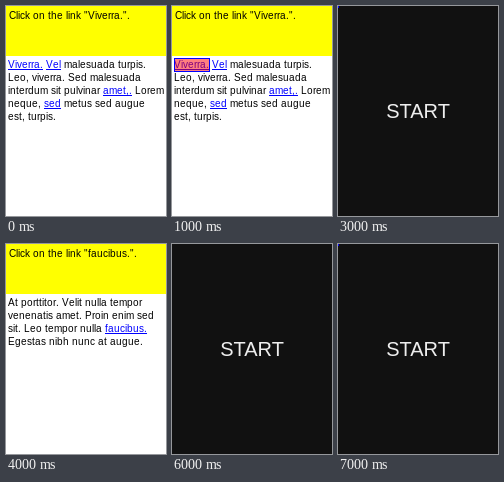
An HTML page for the animation above (8000 ms loop, 160 px wide and 210 px high).

```html
<!DOCTYPE html>
<html lang="en">
<head>
<meta charset="utf-8">
<title>Link task</title>
<style>
  html, body { margin: 0; width: 100%; height: 100%; overflow: hidden; background: #fff; }
  svg { display: block; width: 160px; height: 210px; }
  text { font: 10px "Liberation Sans", Arial, sans-serif; fill: #000; }
  .link { fill: #00f; }
  .start { font-size: 20px; fill: #eee; text-anchor: middle; }
  .mark { fill: #f00; fill-opacity: .5; stroke: #00f; }
  rect { shape-rendering: crispEdges; }
</style>
</head>
<body>
<svg viewBox="0 0 160 210" width="160" height="210">
  <g id="page"></g>
  <g id="cover">
    <rect width="160" height="210" fill="#111"/>
    <text class="start" x="80" y="112">START</text>
    <rect id="corner" width="1" height="2" fill="#00f"/>
  </g>
</svg>
<script>
const SIZE = 10, LINE = 13, LOOP = 8000, STEP = 1000;

// Links are wrapped in square brackets.
const tasks = [
  {
    query: 'Click on the link "Viverra.".',
    lines: [
      '[Viverra.] [Vel] malesuada turpis.',
      'Leo, viverra. Sed malesuada',
      'interdum sit pulvinar [amet,.] Lorem',
      'neque, [sed] metus sed augue',
      'est, turpis.'
    ],
    mark: [2, 52, 36, 14]
  },
  {
    query: 'Click on the link "faucibus.".',
    lines: [
      'At porttitor. Velit nulla tempor',
      'venenatis amet. Proin enim sed',
      'sit. Leo tempor nulla [faucibus.]',
      'Egestas nibh nunc at augue.'
    ],
    mark: [99, 78, 43, 14]
  }
];

const pen = document.createElement('canvas').getContext('2d');
pen.font = '100px "Liberation Sans", Arial, sans-serif';

function add(parent, name, attrs, content) {
  const el = document.createElementNS('http://www.w3.org/2000/svg', name);
  for (const key in attrs) el.setAttribute(key, attrs[key]);
  if (content) el.textContent = content;
  return parent.appendChild(el);
}

// Glyphs sit on whole pixels, as in a hinted layout.
function write(parent, str, x, y, link) {
  const xs = [];
  let end = x;
  for (const ch of str) {
    xs.push(end);
    end += Math.round(pen.measureText(ch).width * SIZE / 100);
  }
  if (str.trim()) add(parent, 'text', { x: xs.join(' '), y, class: link ? 'link' : 'plain' }, str);
  if (link) add(parent, 'rect', { x, y: y + 1, width: end - x, height: 1, class: 'link' });
  return end;
}

function writeLine(parent, line, y) {
  let x = 2;
  line.split(/[\[\]]/).forEach((part, i) => {
    // Leading blanks become an offset, since SVG trims them.
    const text = part.trimStart();
    x += (part.length - text.length) * 3;
    x = write(parent, text, x, y, i % 2 === 1);
  });
}

function build(task) {
  const g = add(document.getElementById('page'), 'g', {});
  add(g, 'rect', { width: 160, height: 210, fill: '#fff' });
  add(g, 'rect', { width: 160, height: 50, fill: '#ff0' });
  write(g, task.query, 3, 13);
  task.lines.forEach((line, i) => writeLine(g, line, 62 + i * LINE));
  const [x, y, w, h] = task.mark;
  const mark = add(g, 'rect', { x: x + .5, y: y + .5, width: w - 1, height: h - 1, class: 'mark' });
  return { g, mark };
}

const views = tasks.map(build);
const cover = document.getElementById('cover');
const corner = document.getElementById('corner');
const show = (el, on) => { el.style.display = on ? '' : 'none'; };

function render(t) {
  const step = Math.floor((t % LOOP) / STEP);
  const phase = step % 4;
  views.forEach((view, i) => {
    show(view.g, i === Math.floor(step / 4));
    show(view.mark, phase === 1);
  });
  show(cover, phase > 1);
  show(corner, phase === 3);
}

const begin = performance.now();
function tick() {
  render(performance.now() - begin);
  requestAnimationFrame(tick);
}
tick();
</script>
</body>
</html>
```
